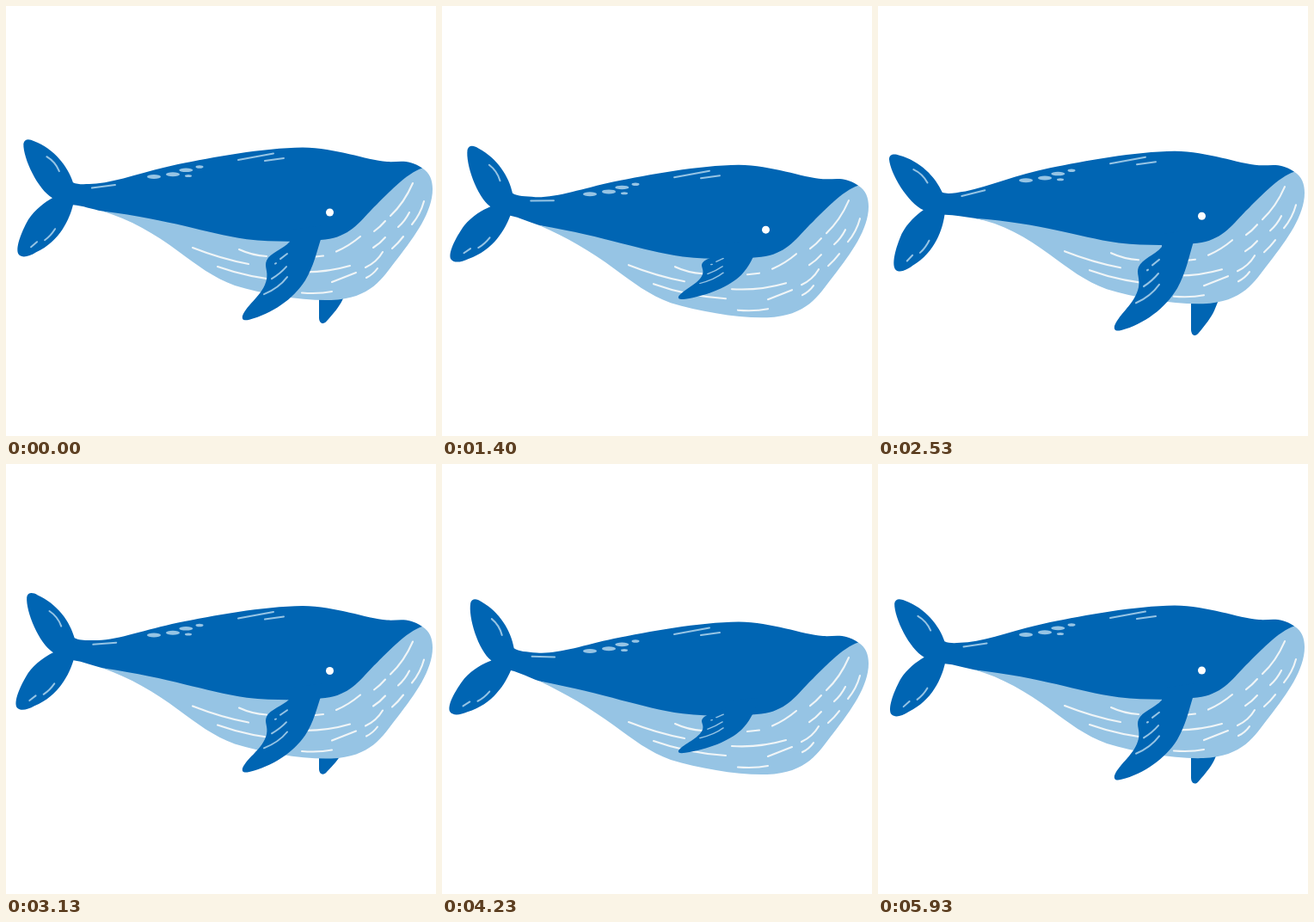
These frames come from a looping animation (500 px wide and 500 px high, 6010 ms). An HTML page with a canvas:

```html
<!DOCTYPE html>
<html lang="en">
<head>
<meta charset="utf-8">
<title>Swimming whale</title>
<style>
html, body { margin: 0; width: 100%; height: 100%; overflow: hidden; background: #fff; }
canvas { display: block; width: 500px; height: 500px; }
</style>
</head>
<body>
<canvas id="stage" width="500" height="500"></canvas>
<script>
const ctx = document.getElementById('stage').getContext('2d');
const DARK = '#0065b3', LIGHT = '#96c4e4', PALE = '#f0f5f7', WHITE = '#fdfefe';
const LOOP = 6010, RAD = Math.PI / 180;
const PIVOT = { x: 150, y: 240 };

const BODY = `M54,223 C37,213 20,177 20.5,160 C21.5,154 27,154 33,157
  C56,166 72,186 78,205 C84,208 93,207 105,206.5 C131,204 162,192 200,184
  C240,176 298,165 345,164.5 C384,165 418,179 443,181 C457,182 467,177 484,188.5
  L470,240 L380,300 L230,265 L112,238.5 C100,236 89,232 78,231
  C74,247 63,273 35,286 C27,291 19,293 15,289 C10,283 17,264 26,248 C34,236 45,228 54,223 Z`;
const BELLY = `M484,188.5 C466,194 443,219 424,238 C407,256 396,270 366,272
  C345,274 315,275 280,271.3 C228,263.5 195,249 112,238.5 C144,248 173,265 200,285
  C222,301 241,316 266,325 C300,335 344,343 378,342 C425,340 437,317 455,294
  C476,267 496,239 496,213 C496,203 493,194 484,188.5 Z`;
const NEAR_FIN = `M330,260 L330,274 C322,283 307,287 303,296 C300,303 305,308 303,318
  C299,336 281,346 275,360 C274,365 277,366 283,364.5 C309,358 334,341 348,319
  C358,302 361,287 367,268 L367,255 Z`;
const FAR_FIN = 'M364,300 L364,362 C364,369 369,371 373,366 C381,357 387,350 391,342 L405,310 Z';

const BELLY_LINES = `M217,281 Q250,294 282,300 M271,283 Q286,290 303,291 M246,303 Q285,317 330,320
  M337,309 Q369,311 400,302 M355,292 L369,290.5 M384,285.5 Q399,279 412,268
  M379,321 L407,310 M344,333.5 Q364,335 379,332 M418,304 Q431,298 438,286
  M428,262 Q435,257 441,250 M447,244 Q463,229 473,206 M427,281 Q435,276 441,269
  M449,282 Q456,276 462,268 M456,257 Q464,250 469,240 M472,254 Q482,242 486,227
  M419,316 Q427,312 432,305`;
const BACK_LINES = `M270,179 L311,171.5 M301,180 L323,177 M100,211.5 L127,208
  M47.5,175 Q57.5,181 62,192 M45,272 Q52,267 57,259 M29,280 L36,274`;
const FIN_LINES = 'M319,294 L327,288 M313,299.5 L314,299 M309,317 Q319,311 326,303 M300,335 Q317,328 327,315';
const SPOTS = [[172, 198.5, 8, 2.5], [194, 195.7, 8, 2.5], [209.3, 190.8, 8, 2.3], [225, 187, 4.5, 1.8], [212, 197.5, 4, 1.5]];

// Rotates points left of the pivot, easing in across the tail stock.
function bend(d, angle) {
  return new Path2D(d.replace(/([\d.]+),([\d.]+)/g, (_, px, py) => {
    const x = px - PIVOT.x, y = py - PIVOT.y;
    const a = angle * Math.max(0, Math.min(1, (165 - px) / 45));
    const c = Math.cos(a), s = Math.sin(a);
    return (PIVOT.x + x * c - y * s).toFixed(2) + ',' + (PIVOT.y + x * s + y * c).toFixed(2);
  }));
}

function fill(path, color) {
  ctx.fillStyle = color;
  ctx.fill(path);
}

function stroke(path, color, width) {
  ctx.strokeStyle = color;
  ctx.lineWidth = width;
  ctx.stroke(path);
}

function oval(x, y, rx, ry, color) {
  const path = new Path2D();
  path.ellipse(x, y, rx, ry, 0, 0, 7);
  fill(path, color);
}

function squash(originY, scale, draw) {
  ctx.save();
  ctx.translate(0, originY);
  ctx.scale(1, scale);
  ctx.translate(0, -originY);
  draw();
  ctx.restore();
}

function render(step) {
  const phase = step * 6 * RAD;
  const tail = (2.1 + 8.6 * Math.sin(phase - 15 * RAD)) * RAD;
  const fin = 0.825 + 0.25 * Math.cos(phase + 45 * RAD);
  const eye = Math.min(1, Math.abs(step % 60 - 25) / 3);

  ctx.clearRect(0, 0, 500, 500);
  ctx.lineCap = 'round';
  ctx.save();
  ctx.translate(0, 10.2 * (1 - Math.cos(phase)));

  squash(229, fin, () => fill(new Path2D(FAR_FIN), DARK));
  fill(bend(BODY, tail), DARK);
  fill(bend(BELLY, tail), LIGHT);
  stroke(new Path2D(BELLY_LINES), PALE, 2.1);
  stroke(bend(BACK_LINES, tail), LIGHT, 2);
  SPOTS.forEach(s => oval(...s, LIGHT));
  squash(250, fin, () => {
    fill(new Path2D(NEAR_FIN), DARK);
    stroke(new Path2D(FIN_LINES), LIGHT, 2);
  });
  if (eye) oval(376.5, 240, 4.5, 4.5 * eye, WHITE);
  ctx.restore();
}

function tick() {
  // Steps alternate between 30 ms and 70 ms holds.
  const t = performance.now() % LOOP;
  render(Math.min(119, 2 * Math.floor(t / 100) + (t % 100 >= 30 ? 1 : 0)));
  requestAnimationFrame(tick);
}
tick();
</script>
</body>
</html>
```
